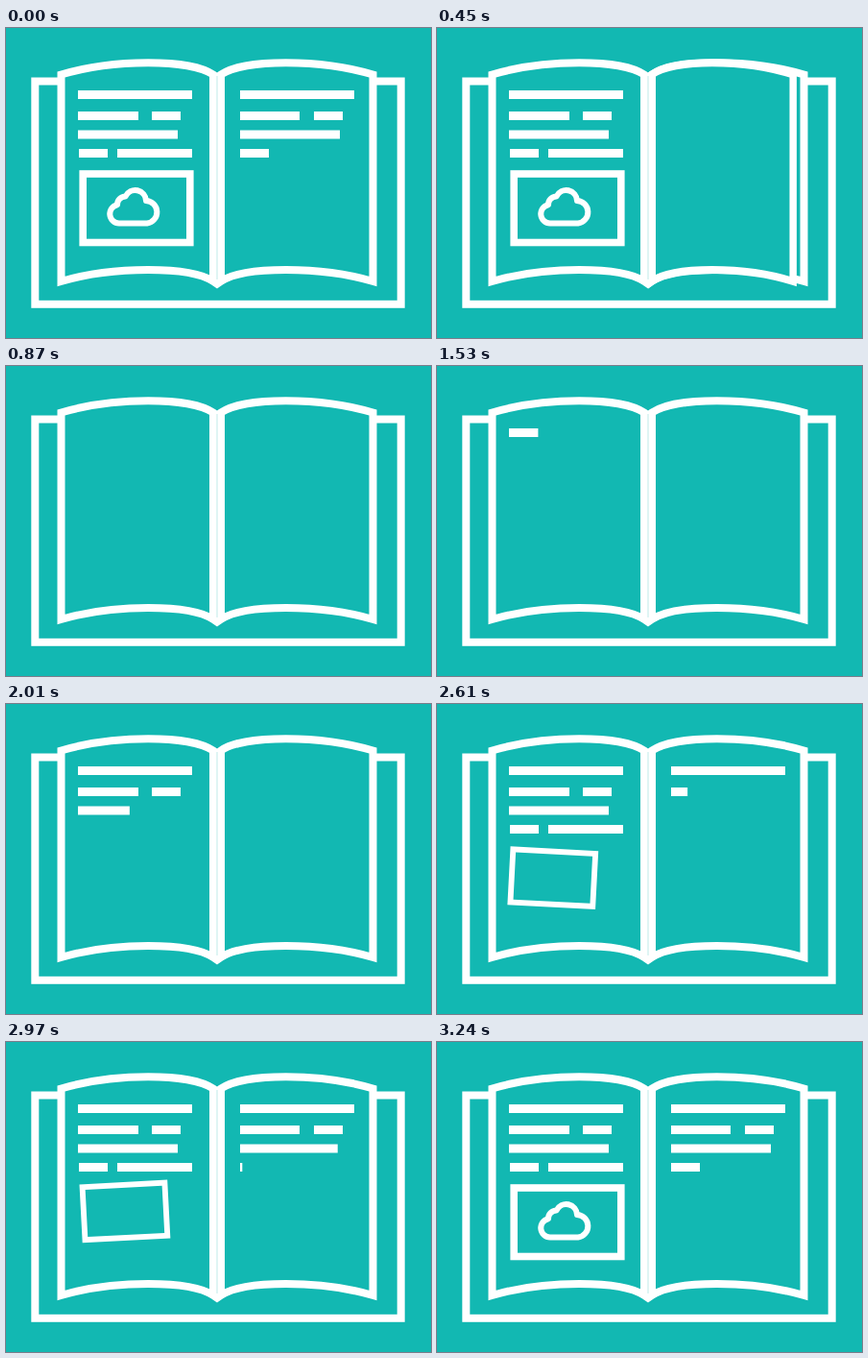
An HTML page for the animation above (4600 ms loop, 443 px wide and 323 px high).

```html
<!DOCTYPE html>
<html lang="en">
<head>
<meta charset="utf-8">
<title>Book</title>
<style>
  html, body { margin: 0; width: 100%; height: 100%; overflow: hidden; background: #12b8b2; }
  svg { display: block; width: 100%; height: 100%; }
  .ink { fill: #12b8b2; stroke: #fff; stroke-width: 8; }
  #lines { fill: #fff; }
</style>
</head>
<body>
<svg viewBox="0 0 443 323">
  <defs>
    <path id="page" class="ink" d="M4 48.5C28 32 108 32 162.5 48.5V264C108 248 28 248 4 264Z"/>
  </defs>
  <rect class="ink" x="30.3" y="55.5" width="381.4" height="232.3"/>
  <use href="#page" transform="translate(220 0) scale(-1 1)"/>
  <use href="#page" transform="translate(220 0)"/>
  <g id="lines"></g>
  <g id="picture">
    <rect class="ink" x="80.2" y="152" width="111.6" height="71.5" style="stroke-width:7.6"/>
  </g>
  <g id="cloud">
    <path class="ink" style="stroke-width:6;stroke-linejoin:round" d="M118 203.5A9.7 9.7 0 0 1 116 184.3A8.5 8.5 0 0 1 124.5 175.5A11.3 11.3 0 0 1 146 180A11.8 11.8 0 0 1 147 203.5Z"/>
  </g>
  <use id="leaf" href="#page"/>
  <path d="M216 49V264M224 49V264" stroke="#fff" stroke-width="8"/>
  <path d="M220 50V262" stroke="#bfeae8"/>
</svg>
<script>
const LOOP = 4600, STEP = 30, SPINE = 220;
const FLIP = 420, FLIPPED = 870;
const WRITE = 1468, SPEED = 0.4905; // px per ms

// x, y, width in writing order
const lines = [
  [75, 65, 119], [75, 87, 63], [152, 87, 30], [75, 106.5, 104], [76, 126, 30], [116, 126, 78],
  [244, 65, 119], [244, 87, 62], [321, 87, 30], [244, 106.5, 104], [244, 126, 30]
];
const byId = id => document.getElementById(id);
const ramp = (t, a, b) => Math.min(1, Math.max(0, (t - a) / (b - a)));
const smooth = p => p * p * (3 - 2 * p);

function place(el, visible, transform) {
  el.setAttribute("visibility", visible ? "visible" : "hidden");
  el.setAttribute("transform", transform);
}

let clock = WRITE;
const bars = lines.map(([x, y, w], i) => {
  const el = document.createElementNS("http://www.w3.org/2000/svg", "rect");
  el.setAttribute("x", x);
  el.setAttribute("y", y);
  el.setAttribute("height", 9);
  byId("lines").append(el);
  const start = clock;
  clock += w / SPEED;
  // the last line is written more slowly
  return i === lines.length - 1
    ? { el, x, w, start: 2955, end: 3150 }
    : { el, x, w, start, end: clock };
});

function draw(t) {
  const old = t < FLIPPED;
  for (const { el, x, w, start, end } of bars) {
    const shown = old ? (x < SPINE || t < FLIP ? 1 : 0) : ramp(t, start, end);
    el.setAttribute("width", w * shown);
  }

  const turn = Math.cos(Math.PI * ramp(t, FLIP - 27, FLIPPED));
  place(byId("leaf"), t >= FLIP && old, `translate(${SPINE} 0) scale(${turn} 1)`);

  const size = old ? 1 : 0.77 * smooth(ramp(t, 2370, 2490)) + 0.23 * smooth(ramp(t, 3060, 3240));
  const tilt = old ? 0 : 3 * Math.sin(2 * Math.PI * ramp(t, 2430, 3150));
  place(byId("picture"), size > 0,
    `translate(77 149) rotate(${tilt}) scale(${size}) translate(-77 -149)`);

  const puff = old ? 1 : smooth(ramp(t, 3090, 3240));
  place(byId("cloud"), puff > 0, `translate(134 188) scale(${puff}) translate(-134 -188)`);
}

function tick() {
  const t = performance.now() % LOOP;
  draw(Math.floor(t / STEP) * STEP);
  requestAnimationFrame(tick);
}
tick();
</script>
</body>
</html>
```
